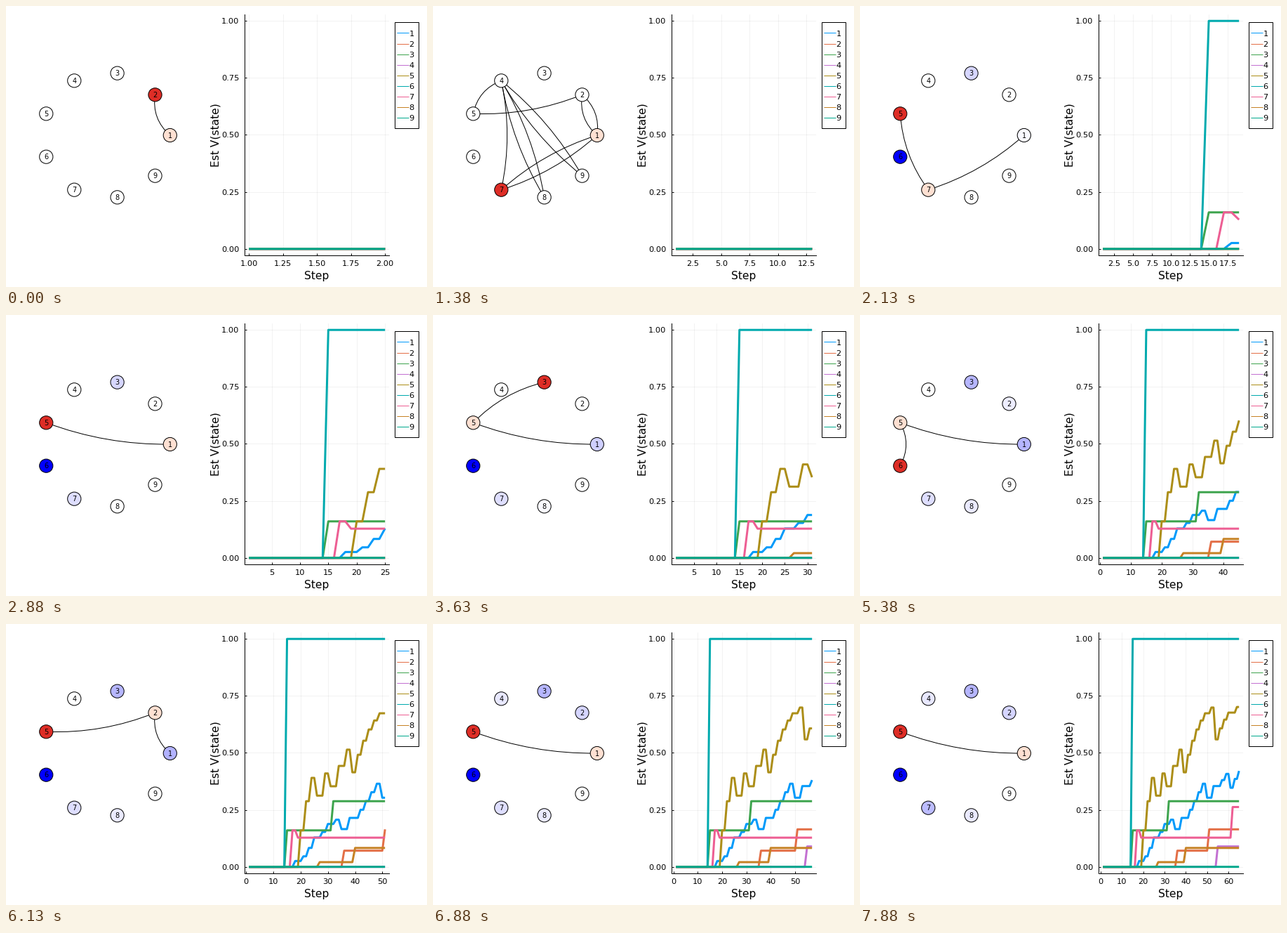
A matplotlib script for the animation above (8000 ms loop, 600 px wide and 400 px high).

```python
import numpy as np
import matplotlib.pyplot as plt
from matplotlib.animation import FuncAnimation
from matplotlib.patches import Circle, PathPatch, Rectangle
from matplotlib.path import Path

W, H, DPI = 600, 400, 100
PX = 72 / DPI  # points per pixel
FRAMES, INTERVAL = 64, 125
ALPHA, GAMMA, GOAL = 0.2, 0.8, 6
COLORS = ["#009afa", "#e36f47", "#3ea44e", "#c371d2", "#ac8e18",
          "#00aaae", "#ed5e93", "#c68225", "#00a98d"]
PREV, CURRENT = "#fee0d2", "#de2d26"
SMALL, LARGE = 8.2, 11.2

# Random walks of the learner; each episode starts at 1 and ends at the goal.
EPISODES = ("121254849471736 176 1756 156 156 158156 1536 156 1256 15856 "
            "156 156 156 156 1256 15456 156 156 176 156 15").split()


def learn():
    """TD(0) values after every step, and the path walked so far."""
    v = np.zeros(10)
    values, paths = [v.copy()], [[]]
    for episode in EPISODES:
        nodes = [int(c) for c in episode]
        for n in range(1, len(nodes)):
            s, t = nodes[n - 1], nodes[n]
            if t == GOAL:
                v[GOAL] = 1
            v[s] += ALPHA * (GAMMA * v[t] - v[s])
            values.append(v.copy())
            paths.append(nodes[:n + 1])
    return np.array(values), paths


def nice_ticks(lo, hi):
    """Pick 4 to 8 ticks by count, coverage and roundness."""
    best, choice = None, None
    for z in (-2, -1, 0, 1):
        for q, nice in ((1, 1), (5, 0.9), (2, 0.7), (2.5, 0.5), (3, 0.2)):
            step = q * 10.0 ** z
            ticks = np.arange(np.ceil(lo / step), np.floor(hi / step) + 1) * step
            n = len(ticks)
            if not 4 <= n <= 8:
                continue
            score = (0.25 * (1 - abs(n - 5) / 5) + 0.25 * nice
                     + 0.5 * (hi - lo) / ((n - 1) * step))
            key = (round(score, 9), -n)
            if best is None or key > best:
                best, choice = key, (ticks, step)
    ticks, step = choice
    digits = next(d for d in range(4) if abs(round(step, d) - step) < 1e-9)
    return ticks, [f"{t + 0:.{digits}f}" for t in ticks]


VALUES, PATHS = learn()
angle = np.radians(40 * np.arange(9))
POS = np.column_stack([142.8 + 91 * np.cos(angle), 184 - 89.7 * np.sin(angle)])


def edge_path(s, t):
    """Quadratic curve bowed to the left of its direction of travel."""
    a, b = POS[s - 1], POS[t - 1]
    dx, dy = (b - a) / np.hypot(*(b - a))
    return Path([a, (a + b) / 2 + 16.8 * np.array([dy, -dx]), b],
                [Path.MOVETO, Path.CURVE3, Path.CURVE3])


plt.rcParams["font.family"] = "DejaVu Sans"
fig = plt.figure(figsize=(W / DPI, H / DPI), dpi=DPI, facecolor="white")

# Canvas in pixel coordinates for graph, legend and axis titles.
canvas = fig.add_axes([0, 0, 1, 1])
canvas.set(xlim=(0, W), ylim=(H, 0))
canvas.axis("off")

discs = []
for i, (x, y) in enumerate(POS):
    disc = Circle((x, y), 9.6, fc="white", ec="black", lw=PX, zorder=3)
    discs.append(canvas.add_patch(disc))
    canvas.text(x, y + 3.6, str(i + 1), size=7, ha="center", zorder=4)

canvas.add_patch(Rectangle((554, 23), 34, 151, fc="white", ec="black", lw=PX))
for i, color in enumerate(COLORS):
    y = 38.4 + 15.1 * i
    canvas.plot([556.5, 573.5], [y, y], color=color, lw=PX,
                solid_capstyle="butt")
    canvas.text(574.4, y + 4.2, str(i + 1), size=SMALL)

canvas.text(443, 389, "Step", size=LARGE, ha="center")
canvas.text(299, 183.5, "Est V(state)", size=LARGE, rotation=90,
            ha="center", va="center")

# Chart of the estimates.
LEFT, RIGHT, TOP, BOTTOM = 340.4, 546, 11.5, 355.4
chart = fig.add_axes([LEFT / W, 1 - BOTTOM / H, (RIGHT - LEFT) / W,
                      (BOTTOM - TOP) / H], facecolor="none")
chart.set_ylim(-0.03, 1.03)
chart.set_yticks([0, 0.25, 0.5, 0.75, 1], ["0.00", "0.25", "0.50", "0.75", "1.00"])
chart.spines[["top", "right"]].set_visible(False)
chart.spines[["left", "bottom"]].set_linewidth(PX)
chart.set_axisbelow(True)
chart.grid(color="black", alpha=0.07, lw=0.5)
chart.tick_params(direction="in", length=2.5, width=PX, labelsize=SMALL)
chart.tick_params(axis="x", pad=5.1)
chart.tick_params(axis="y", pad=5.8)
curves = [chart.plot([], [], color=c, lw=3 * PX, solid_capstyle="butt",
                     snap=False, zorder=3)[0] for c in COLORS]

edges = []


def draw(frame):
    last = frame + 2
    value, path = VALUES[last - 1], PATHS[last - 1]

    while edges:
        edges.pop().remove()
    for s, t in sorted(set(zip(path, path[1:]))):
        edge = PathPatch(edge_path(s, t), fc="none", ec="black", lw=PX, zorder=2)
        edges.append(canvas.add_patch(edge))

    for i, disc in enumerate(discs):
        fade = 1 - value[i + 1]
        disc.set_facecolor((fade, fade, 1))
    discs[path[-2] - 1].set_facecolor(PREV)
    discs[path[-1] - 1].set_facecolor(CURRENT)

    steps = np.arange(1, last + 1)
    for i, curve in enumerate(curves):
        curve.set_data(steps, VALUES[:last, i + 1])
    pad = 0.03 * (last - 1)
    lo, hi = 1 - pad, last + pad
    chart.set_xticks(*nice_ticks(lo, hi))
    chart.set_xlim(lo, hi)
    return edges + discs + curves


anim = FuncAnimation(fig, draw, frames=FRAMES, interval=INTERVAL,
                     repeat=True, repeat_delay=0, blit=False)
plt.show()
```
